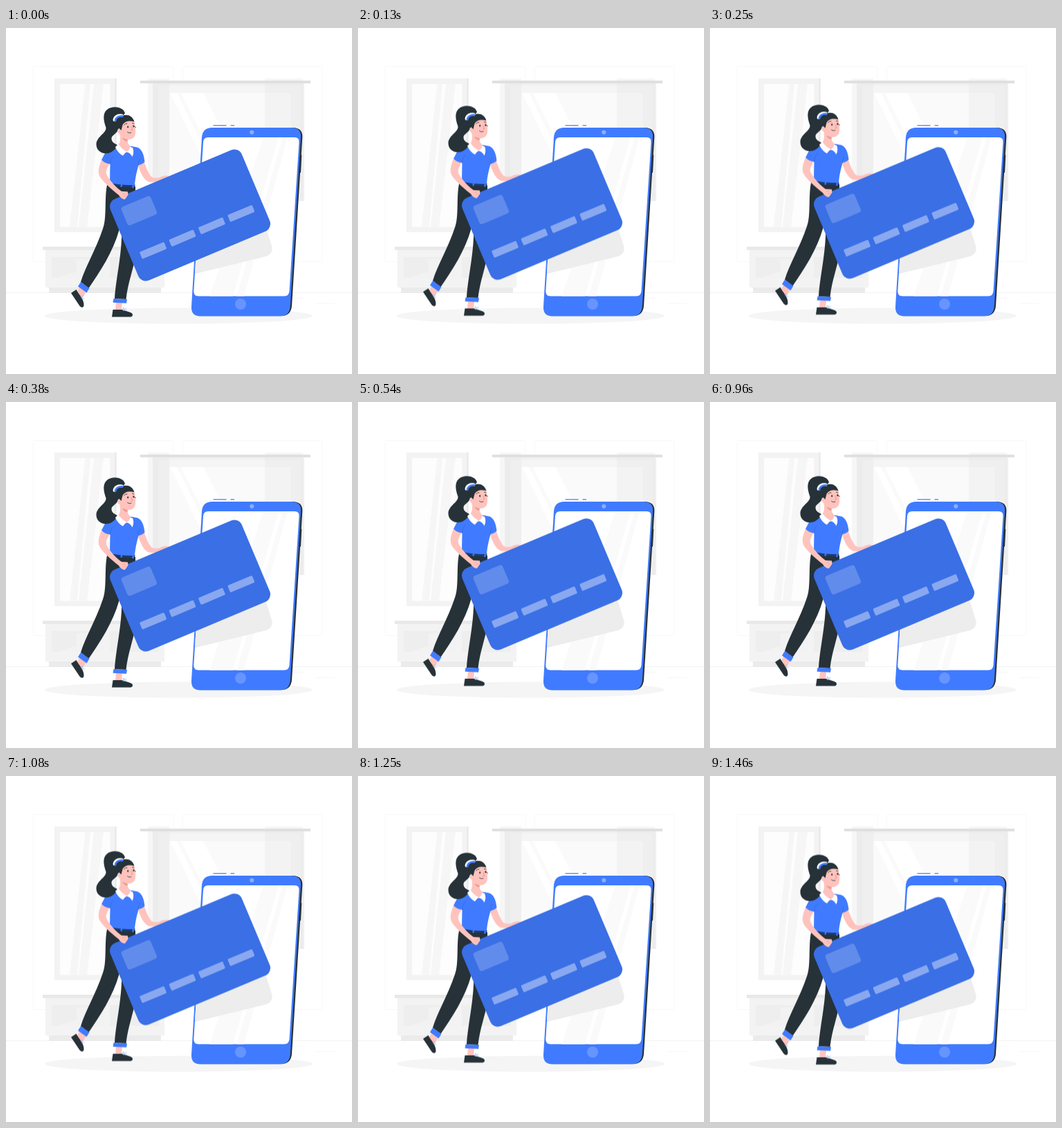
Recreate the animation shown at these times as an HTML page. Size 500 by 500 pixels, loop 1500 ms.

```html
<!DOCTYPE html>
<html lang="en">
<head>
<meta charset="utf-8">
<title>Card payment</title>
<style>
  html, body { margin: 0; width: 100%; height: 100%; overflow: hidden; background: #fff; }
  svg { display: block; width: 100%; height: 100%; }
  .float { animation: float 1.5s linear infinite; }
  @keyframes float { 50% { transform: translateY(-10px); } }
  .blue { fill: #407bff; }
  .dark { fill: #263238; }
  .skin { fill: #ffc3bd; }
  .line { fill: none; stroke-linecap: round; stroke-linejoin: round; }
</style>
</head>
<body>
<svg viewBox="0 0 500 500">
  <defs>
    <path id="screen" d="M292 158H417Q424 158 423.500 165L409.500 380Q409 387.500 402 387.500H278Q271 387.500 271.300 380L285 165Q285.500 158 292 158Z"/>
    <clipPath id="glass"><use href="#screen"/></clipPath>
    <rect id="digits" x="-19.200" y="-5.400" width="38.400" height="10.800" rx="1.600"/>
  </defs>

  <!-- room -->
  <g class="line" stroke="#f6f6f6" stroke-width=".8">
    <rect x="39" y="55.500" width="203" height="282" rx="2"/>
    <rect x="255" y="55.500" width="202" height="282" rx="2"/>
    <path d="M0 382.500H500" stroke="#ebebeb" stroke-width=".6"/>
    <path d="M415 390.500H432M447 398.300H475" stroke="#f0f0f0" stroke-width=".6"/>
  </g>

  <!-- left window -->
  <path d="M150 73H159.500V295H150Z" fill="#e6e6e6"/>
  <path d="M70 73H157.500V295H70Z" fill="#f3f3f3"/>
  <path d="M78 81H150.500V287.500H78Z" fill="#fdfdfd"/>
  <path d="M114.500 81H122L103 287.500H92ZM127 81H141L117 287.500H105Z" fill="#f6f6f6"/>

  <!-- right window and curtains -->
  <path d="M212 80H431V250H212Z" fill="#f0f0f0"/>
  <path d="M220 83H426V250H220Z" fill="#f5f5f5"/>
  <path d="M236 94H412V250H236Z" fill="#fafafa"/>
  <path d="M237 94H247L302 205V222H300ZM253 94H285L335 190V222H316Z" fill="#fff"/>
  <g fill="#e0e0e0" fill-opacity=".3">
    <path d="M205 73H236V240H205ZM209 73H222V240H209ZM215 73H220V240H215Z"/>
    <path d="M374 73H429V250H374ZM393 73H427V250H393ZM413 73H420V250H413Z"/>
  </g>
  <path d="M194 76H440V80H194Z" fill="#e0e0e0"/>

  <!-- dresser -->
  <path d="M62 375H224V383H62Z" fill="#ebebeb"/>
  <path d="M57 320H229V375H57Z" fill="#f3f3f3"/>
  <path d="M53 316H229V321H53Z" fill="#e9e9e9"/>
  <path d="M66 331H141V361H66ZM150 331H221V361H150Z" fill="#eeeeee"/>
  <path d="M102 334H141V361H75L102 352Z" fill="#f2f2f2"/>

  <ellipse cx="249.500" cy="416" rx="193.500" ry="11.500" fill="#f5f5f5"/>

  <!-- phone -->
  <path class="dark" d="M300 144H414Q429 144 428.300 158L413 402Q411.500 416 398 416H300ZM425 183.500H427.300L426 209H423Z"/>
  <path class="blue" d="M298 144H412Q427 144 426 158L410.800 402Q409.500 416.500 396 416.500H281Q267 416.500 268 402L283 158Q284 144 298 144Z"/>
  <path class="line" d="M300 140.800H318M325 140.800H329.500" stroke="#407bff" stroke-width="1.300"/>
  <use href="#screen" fill="#fff"/>
  <g clip-path="url(#glass)">
    <path d="M372 158H394L328 388H294ZM400 158H407L344 388H333Z" fill="#fafafa"/>
    <path d="M268 356.500L376 330Q387 325.500 384 315L370 270L268 310Z" fill="#ededed"/>
  </g>
  <circle cx="355.300" cy="150.700" r="3" fill="#8cb0ff"/>
  <circle cx="339" cy="399" r="8" fill="#6695ff"/>

  <g class="float">
    <!-- far arm -->
    <path class="skin" d="M190 196C194 208 199 221 208 222.500L226 223L238 216C235 212 227 212.500 222 216C216 217.500 211 217 208.500 213C204 206 202 200 199.500 193Z"/>

    <!-- feet -->
    <path class="skin" d="M107 374L116 381L110 391L102 382ZM159 396H168L167 409H158Z"/>
    <path class="dark" d="M94 383L101.500 378C105 385 112.500 391 112.500 400C112.500 405 108.500 404.500 106 401Z"/>
    <path class="dark" d="M154.500 407L168 407C174 409.500 182.500 410.500 183 414C183 417 181 417.500 178 417.500H153Z"/>
    <path class="line" d="M108 388L112 387M109 390L113 391M168 407L170 404L171 407L174 405M169 408L174 408" stroke="#9fc0f0" stroke-width=".9"/>

    <!-- legs -->
    <path class="dark" d="M146 227C142 246 146 275 140 290C130 320 115 344 108 367L119.500 376C136 352 155 323 163.500 292L167 284C169 322 159 360 157 391L173.500 392C176 368 184 350 188 325L187 229Z"/>
    <path class="blue" d="M108 367L120.500 376L116.500 382.500L104 373.500ZM155.500 391L175 392L174 397.800L154.500 396.800Z"/>

    <!-- shirt and belt -->
    <path fill="#1c3a70" d="M150.500 223L186.500 226L186 231L149 228Z"/>
    <path d="M166 224.500L168.500 224.700L167.500 230L165.500 229.800ZM183 226L185 226L184.500 231L182 231Z" class="blue"/>
    <path class="blue" d="M159 169C152 169.500 147 172 145 177L138 190.500C141 194.500 146 196.500 150.500 196.500L150 223.500C161 226.500 174 227 186 227C187 215 189 208 191.500 198C195 197.500 198 196 200.500 193.500C199.500 186 198 176 190 172.500L182 171Z"/>
    <path class="line" d="M150.500 196.500C151 191 152 188 155 185M191.500 198C191 194 192 192 194 189" stroke="#3567d6" stroke-width=".7"/>

    <!-- ponytail -->
    <path class="dark" d="M172 123C169 113 153 112 146 118C139 124 141 134 144.500 144C145 152 132 156 130.500 167C130 177 138 182 147 181C153 180 158 176 161 169C157 167 152 165 152.500 159C153 155 158 154 161 149L166 131Z"/>

    <!-- neck and collar -->
    <path class="skin" d="M164 152C166 160 165 166 162 169L173 181L181 174L179 170C176 167 175 164 176 160Z"/>
    <path d="M168 159C170 162 173 164 175.300 164L176 160Z" fill="#ef9a93"/>
    <path fill="#fff" d="M158 172L162.500 167.500C165 172 169 176 174 178.500L169 184.500C164 182 160 177 158 172ZM174 178.500C177 178 179 175 179.500 171.500L183 173C185 177 184.500 182 182.500 186Z"/>
    <path class="blue" d="M170 184Q175 175 182 185L176 190Z"/>

    <!-- head -->
    <path class="skin" d="M163 135C163 145 163 155 171 159.500C177 163 184 161 186.500 155C188 149 187 141 184.500 133L174 129Z"/>
    <path class="dark" d="M159 149C156 138 159 130 168 127C175 124 183 127 185.500 135.500C178 133 171 135 168.500 140L166.500 148L163.500 145Z"/>
    <path class="skin" d="M166 148C164 144 160 146 161.500 150C162.500 153 165 154 167 152Z"/>
    <path class="line" d="M156.500 133C157 128 162 125.500 167.500 126.500" stroke="#fff" stroke-width="4"/>
    <path class="line" d="M158 134C158.500 129.500 163 127 168 127.500" stroke="#407bff" stroke-width="2.800"/>
    <ellipse class="dark" cx="176.200" cy="143" rx="1" ry="1.400"/>
    <ellipse class="dark" cx="184.300" cy="142" rx="1" ry="1.400"/>
    <g class="line" stroke="#263238" stroke-width=".8">
      <path d="M170.500 140Q172.500 137.500 175 138M182.500 137.500L185 138M185 142L187.500 143.500"/>
      <path d="M175.500 150.500Q178 152.800 181 151.300"/>
      <path d="M181 143L182.800 147.500L180.800 148" stroke="#ed847e"/>
    </g>

    <!-- card -->
    <g transform="translate(266 270.500) rotate(-22.800)">
      <rect x="-103" y="-63.800" width="206" height="127.600" rx="12" fill="#3a6fe6"/>
      <g fill="#fff">
        <rect x="-88.400" y="-49" width="46" height="29" rx="4" opacity=".2"/>
        <g opacity=".4">
          <use href="#digits" x="-69" y="26.300"/>
          <use href="#digits" x="-23" y="26.300"/>
          <use href="#digits" x="23" y="26.300"/>
          <use href="#digits" x="69" y="26.300"/>
        </g>
      </g>
    </g>

    <!-- near arm -->
    <path class="skin" d="M138 190.500C133 203 132 210 137 217C144 226 155 235 163 241.500C165 245 169 248 172 247.500L176.500 241L176 236.500L167 236C160 231 152 223 146.500 214C142 207 147 202 149.500 196.500C145 196 141 194 138 190.500Z"/>
    <path class="line" d="M168 240L172 239M170 243L173.500 241.500" stroke="#ed9a93" stroke-width=".6"/>
  </g>
</svg>
</body>
</html>
```
